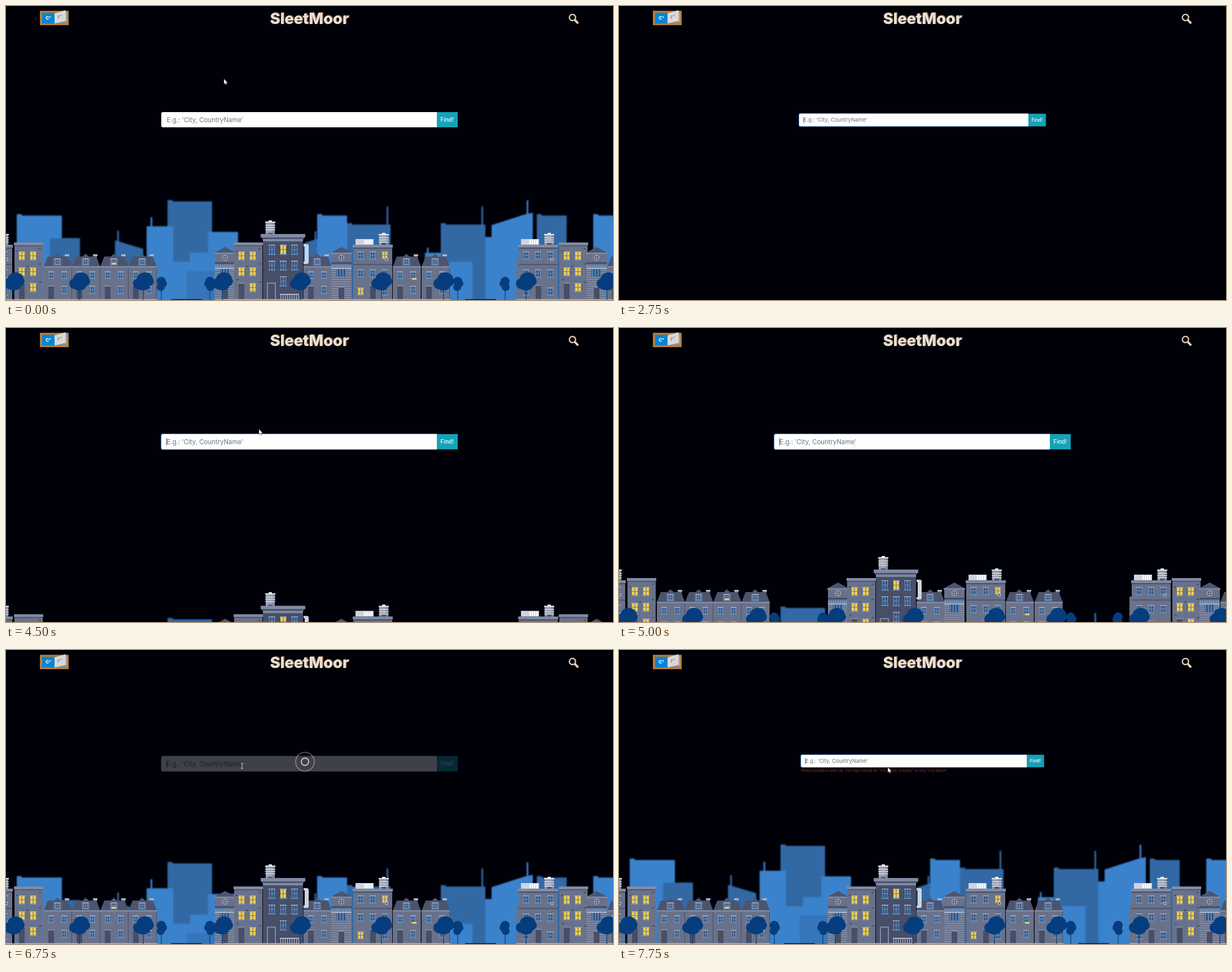
These frames come from a looping animation (1075 by 521 pixels, 8 s). An HTML page:

```html
<!DOCTYPE html>
<html lang="en">
<head>
<meta charset="utf-8">
<title>Weather search</title>
<style>
html, body { margin: 0; width: 100%; height: 100%; overflow: hidden; background: #000009; }
svg { display: block; width: 100%; height: 100%; font-family: Inter, Roboto, sans-serif; }
</style>
</head>
<body>
<svg id="stage" viewBox="0 0 1075 521" preserveAspectRatio="none">
  <defs>
    <filter id="soft" x="-2%" y="-2%" width="104%" height="104%"><feGaussianBlur stdDeviation="1.1"/></filter>
  </defs>
  <rect width="1075" height="521" fill="#000009"/>
  <g id="back" filter="url(#soft)"></g>
  <g id="front"></g>

  <g id="header">
    <rect x="60" y="8.500" width="51" height="25.500" fill="#b47d39"/>
    <rect x="64" y="12" width="43.500" height="19" fill="#93621f"/>
    <rect x="64" y="12" width="22" height="19" fill="#0585d3"/>
    <path d="M86 31 106 26 108 30 106 31z" fill="#8c8c8e"/>
    <path d="M105 8 108 11V30L105 27z" fill="#a6a6a8"/>
    <path d="M86 13 105.500 7.500V26.500L86 31z" fill="#d9d9db"/>
    <text x="75" y="24" font-size="8" font-weight="800" fill="#fff" text-anchor="middle">C°</text>
    <text transform="translate(95.500 22) skewY(-14)" font-size="8" font-weight="600" fill="#85858a" text-anchor="middle">F°</text>
    <g font-size="27.200" font-weight="800" text-anchor="middle">
      <text x="538.800" y="30.800" fill="#8a5930">SleetMoor</text>
      <text x="537.300" y="32" fill="#e6e1d9">SleetMoor</text>
    </g>
    <g fill="none">
      <g stroke="#7d5230" transform="translate(.9 -.6)"><circle cx="1003" cy="20.500" r="5.500" stroke-width="1.900"/><path d="M1007.300 24.800 1013 31" stroke-width="3.300"/></g>
      <g stroke="#e8dcc9"><circle cx="1003" cy="20.500" r="5.500" stroke-width="1.900"/><path d="M1007.300 24.800 1013 31" stroke-width="3.300"/></g>
    </g>
  </g>

  <g id="form">
    <g id="bar">
      <path id="ring" d="M763 187.500H278q-3.500 0-3.500 3.500v21q0 3.500 3.500 3.500H763z" fill="none" stroke="#1c55a0" stroke-width="1.400"/>
      <path d="M763 188H278q-3 0-3 3v21q0 3 3 3H763z" fill="#fff"/>
      <rect x="763" y="188" width="37" height="27" fill="#17a2b8"/>
      <text x="781.300" y="204.800" font-size="9.900" font-weight="500" fill="#fff" text-anchor="middle">Find!</text>
      <text id="hint" x="284.500" y="205.600" font-size="11.400" fill="#6c757d">E.g.: 'City, CountryName'</text>
      <text id="typed" x="284.500" y="205.600" font-size="11.400" fill="#495057"></text>
      <rect id="caret" y="195" width="1" height="13.500" fill="#495057"/>
    </g>
    <text id="error" x="275" y="218.300" font-size="7.450" fill="#a82c3a">Please provide a valid city. The input should be "City Name, Country" or only "City Name".</text>
  </g>

  <g id="list" font-size="6.900" font-weight="600" fill="#fff" style="font-family:'Open Sans','Noto Sans',sans-serif">
    <path d="M275 215H390V283q0 3-3 3H278q-3 0-3-3z" fill="#29292c"/>
    <text x="281.800" y="233">cordoba</text>
    <text x="281.800" y="253.300">cordoba, spain</text>
    <text x="281.800" y="273.600">cordoba, la cajeta de tu vieja</text>
  </g>

  <g id="loader" fill="none" stroke="#fff" stroke-width="1.900">
    <circle cx="529.500" cy="198"/><circle cx="529.500" cy="198"/>
  </g>
  <path id="arrow" d="M0 0V9.800L2.200 7.800 3.700 11 5.200 10.300 3.800 7.200H6.600z" fill="#fff" stroke="#222" stroke-width=".5"/>
  <path id="beam" d="M-2-4.500H2M0-4.500V4.500M-2 4.500H2" fill="none" stroke="#e4e4ea" stroke-width=".9"/>
</svg>
<script>
const $ = id => document.getElementById(id);
const LOOP = 8000, STEP = 250;

// Palette
const WALL = '#69728a', DARK = '#474e68', SLATE = '#4d556f', TRIM = '#808aa3', PALE = '#adb7cb',
  GLASS = '#38527f', SKY = '#6798cb', LIT = '#f5d04e', LEAF = '#063d7e', NEAR = '#3b82cc', FAR = '#3069a5';

const box = (x, y, w, h, c) => `<rect x="${x}" y="${y}" width="${w}" height="${h}" fill="${c}"/>`;
const poly = (pts, c) => `<polygon points="${pts}" fill="${c}"/>`;
const dot = (x, y, rx, ry, c) => `<ellipse cx="${x}" cy="${y}" rx="${rx}" ry="${ry}" fill="${c}"/>`;
const span = (n, f) => Array.from({ length: n }, (_, i) => f(i)).join('');

// Distant skyline
function skyline() {
  const tower = (x, to, y, c) => box(x, y, to - x, 540 - y, c);
  const notched = (x, to, y, c) => tower(x, to, y, c) + box(x, y - 2.5, 9, 4, c);
  const mast = (x, y, c) => box(x - 1.5, y, 3, 60, c);
  return notched(19, 99, 372, NEAR) + tower(78, 131, 412, FAR) +
    mast(198.5, 399, FAR) + poly('193,416 243,431 243,540 193,540', FAR) +
    notched(286, 365, 347, FAR) + mast(257.5, 375, NEAR) + tower(249, 296, 391, NEAR) +
    tower(358, 411, 401, NEAR) + tower(326, 360, 438, NEAR) + tower(285, 330, 454, NEAR) +
    box(320, 470, 49, 70, '#3576ba') +
    mast(548, 400, FAR) + poly('527,421 552,413 552,540 527,540', FAR) +
    mast(675.5, 356, FAR) + notched(604, 681, 388, FAR) + notched(551, 604, 372, NEAR) +
    mast(747, 429, NEAR) + tower(742, 771, 438, NEAR) +
    mast(843.5, 356, FAR) + notched(770, 849, 388, FAR) + tower(785, 826, 454, NEAR) +
    tower(849, 862, 410, NEAR) + notched(940, 993, 372, FAR) +
    mast(923.5, 345, NEAR) + poly('860,389 919,370 933,367 933,540 860,540', NEAR) +
    notched(1040, 1085, 372, NEAR);
}

// Parts of the street
function pane(x, y, lit, w = 10, h = 12) {
  const bar = lit ? WALL : SKY, left = x - w / 2, top = y - h / 2;
  return box(left - 1, top - 1.5, w + 2, 1.5, PALE) + box(left, top, w, h, lit ? LIT : GLASS) +
    (lit ? '' : box(left, top, 1, h, SKY) + box(left + w - 1, top, 1, h, SKY)) +
    box(x - .6, top, 1.2, h, bar) + box(left, y - .8, w, 1, bar) +
    box(left - 1.5, top + h, w + 3, 1.6, SKY);
}
const door = (x, y) => box(x - 6, y - 2, 12, 2, TRIM) + box(x - 5, y, 10, 521 - y, DARK);
const tank = (x, y, h) => box(x - 3, y, 6, 3, '#fff') + box(x - 9, y + 2, 18, 2.5, '#e6e9f0') +
  box(x - 8, y + 4.5, 16, h - 4.5, '#9aa0b2') + box(x + 4, y + 4.5, 4, h - 4.5, '#868da1') +
  span(3, i => box(x - 9, y + 8 + i * 4, 18, 1.2, '#dfe3ec')) + box(x - 4, y + h - 3, 8, 3, DARK);

function house(x) {
  return box(x + 1, 421, 50, 100, WALL) + box(x, 419, 52, 5, TRIM) + box(x + 1, 424, 50, 1.5, DARK) +
    [[14, 443], [34, 443], [14, 471], [34, 471], [34, 499]].map(([dx, y]) => pane(x + dx, y, true, 10, 13)).join('') +
    door(x + 14, 492) + [[44, 429], [4, 434], [44, 456], [22, 460], [5, 484], [45, 488]]
      .map(([dx, y]) => box(x + dx, y, 4, 2, DARK)).join('');
}

function terrace(x, lit) {
  const roof = `${x},462 ${x + 7},444 ${x + 43},444 ${x + 50},462`;
  return box(x + 37, 440, 8, 3, PALE) + box(x + 38, 443, 6, 6, TRIM) + poly(roof, SLATE) +
    span(4, i => box(x + 6 - i * 1.4, 447 + i * 4, 38 + i * 2.8, .8, DARK)) +
    poly(`${x + 14},448 ${x + 24},439 ${x + 34},448`, SLATE) + box(x + 17, 447, 14, 13, WALL) +
    pane(x + 24, 453, false, 8, 8) + (lit ? box(x + 20, 455, 8, 3, LIT) : '') +
    box(x, 462, 50, 59, WALL) + box(x, 461, 50, 2.5, TRIM) + box(x + 49, 464, 1, 57, DARK) +
    pane(x + 13, 477, false, 8, 10) + pane(x + 36, 477, false, 8, 10) + pane(x + 36, 503, false, 8, 11) + door(x + 13, 497);
}

function narrow(x) {
  const m = x + 18;
  return poly(`${x - 2},438 ${m},427 ${x + 38},438`, SLATE) + box(x, 438, 36, 83, WALL) + box(x - 1, 437, 38, 2.5, TRIM) +
    dot(m, 446, 5, 5, PALE) + dot(m, 446, 3.8, 3.8, DARK) + box(m - .5, 442, 1, 8, PALE) + box(m - 4, 445.5, 8, 1, PALE) +
    box(x, 454, 36, 3, DARK) + span(9, i => box(x + i * 4 + .5, 459, 2.5, 5, SKY)) + box(x, 464, 36, 2, PALE) +
    span(14, i => box(x, 468 + i * 4, 36, 1.1, '#8f9ab2')) + box(m - 9, 466, 18, 14, GLASS) +
    span(4, i => box(m - 8 + i * 5, 466, 1.5, 14, SKY)) + door(m, 499);
}

function block(x, lit) {
  const at = (c, r) => pane(x + 14 + c * 21.5, 442 + r * 32, lit && (r === 0 && c === 2 || r === 2 && c === 0), 9, 11);
  return tank(x + 55, 402, 21) + box(x + 5, 413, 32, 10, '#cfd4df') + span(4, i => box(x + 20 + i * 4, 414, 2.5, 8, '#fff')) +
    box(x + 1, 425, 69, 96, WALL) + box(x, 423, 71, 5, TRIM) + box(x + 1, 428, 69, 2, DARK) + box(x + 1, 457, 69, 2, SLATE) +
    span(3, c => at(c, 0) + at(c, 1)) + at(0, 2) + at(2, 2) + door(x + 36, 496) +
    dot(x + 60, 449, 3, 3, PALE) + dot(x + 60, 449, 1.5, 1.5, DARK);
}

function hall() {
  return tank(468, 380, 25) + box(455, 410, 71, 111, DARK) + box(451, 404, 79, 6, TRIM) +
    box(453, 410, 75, 3, SLATE) + box(455, 413, 71, 4, TRIM) +
    span(3, c => pane(471 + c * 20, 432, c === 1, 10, 15) + pane(471 + c * 20, 460, false, 10, 14)) +
    pane(491, 488, false, 10, 15) + box(462, 490, 16, 31, TRIM) + box(464, 492, 12, 29, DARK) +
    box(485, 510, 34, 2, PALE) + span(9, i => box(486 + i * 4, 512, 1.2, 9, PALE)) +
    '<path d="M527 422h6q3 0 3 3v29q0 3-3 3h-6v-4h2v-27h-2z" fill="#cdd3e0"/>';
}

function tree(x, small, flip) {
  const s = flip ? -1 : 1;
  const trunk = box(x - .6, 495, 1.2, 26, LEAF);
  return trunk + (small
    ? dot(x, 488, 8, 8, LEAF) + dot(x + 3 * s, 492, 7, 7, LEAF) + dot(x - s, 498, 7, 7, LEAF)
    : dot(x + 3 * s, 484, 14, 12, LEAF) + dot(x - 7 * s, 492, 11, 10, LEAF) + dot(x + 9 * s, 488, 10, 9, LEAF) + dot(x, 496, 12, 8, LEAF));
}

function street() {
  return box(292, 519.5, 55, 20, '#0a2149') + box(813, 519.5, 55, 20, '#0a2149') +
    block(-59) + house(14) + [67, 117, 167, 217].map(x => terrace(x, x === 167)).join('') +
    terrace(527) + narrow(370) + house(403) + hall() + narrow(576) +
    terrace(685) + terrace(736) + box(719, 482, 8, 3, LIT) + block(614, true) +
    block(907) + box(904, 452, 4, 69, WALL) + terrace(1065) + house(979) + narrow(1028) +
    [[0, 268], [370, 416], [786, 1], [904, 171]].map(([x, w]) => box(x, 519.5, w, 1.5, PALE)).join('') +
    [14, 130, 243, 521, 665, 775, 921, 1064].map(x => tree(x, false)).join('') +
    tree(275, true) + tree(361, true, true) + tree(383, false) + tree(800, true) + tree(884, true, true);
}

$('back').innerHTML = skyline();
$('front').innerHTML = street();

// Motion
const clamp = v => Math.min(1, Math.max(0, v));
function bezier(x1, y1, x2, y2) {
  const at = (a, b, u) => 3 * a * u * (1 - u) ** 2 + 3 * b * u * u * (1 - u) + u ** 3;
  return p => {
    p = clamp(p);
    let lo = 0, hi = 1;
    for (let i = 0; i < 24; i++) {
      const mid = (lo + hi) / 2;
      if (at(x1, x2, mid) < p) lo = mid; else hi = mid;
    }
    return at(y1, y2, (lo + hi) / 2);
  };
}
const ease = bezier(.25, .1, .25, 1), easeInOut = bezier(.42, 0, .58, 1);

// Pointer route: time, x, y
const route = [[0, 386, 129], [500, 338, 155], [750, 338, 155], [1250, 231, 12], [1499, 215, -12],
  [3250, 500, -14], [3500, 492, 10], [4000, 466, 120], [4500, 448, 179], [5000, 418, 205.5], [7250, 418, 205.5], [7750, 476, 207.5], [8000, 476, 207.5]];
function pointer(t) {
  const i = Math.max(1, route.findIndex(k => k[0] > t));
  const [a, b] = [route[i - 1], route[i]];
  const p = clamp((t - a[0]) / (b[0] - a[0]));
  return [a[1] + (b[1] - a[1]) * p, a[2] + (b[2] - a[2]) * p];
}

const show = (id, on) => $(id).style.display = on ? '' : 'none';
const move = (id, x, y) => $(id).setAttribute('transform', `translate(${x} ${y})`);

function entry(t) {
  if (t < 5500 || t >= 6750) return '';
  return t < 5750 ? 'c' : t < 6250 ? 'co' : 'cordoba, la cajeta de tu vieja';
}

function draw(t) {
  const reloaded = t >= 2500, failed = t >= 7500, loading = t >= 6750 && !failed;

  move('front', 0, reloaded ? 142 * (1 - easeInOut((t - 3750) / 1750)) : 0);
  move('back', 0, (reloaded ? 179 * (1 - easeInOut((t - 3850) / 4100)) : 0) - .7);

  // The search bar zooms in after each page load
  const p = !reloaded ? 1 : clamp((t - (failed ? 7304 : 2289)) / 1000);
  const scale = .3 + .7 * ease(p);
  $('form').setAttribute('transform', `translate(537.5 205) scale(${scale}) translate(-537.5 -205)`);
  $('form').setAttribute('opacity', loading ? .25 : ease(p * 2));
  move('bar', 0, failed ? -6.6 : 0);
  show('error', failed);
  show('ring', reloaded);

  const text = entry(t);
  $('typed').textContent = text;
  show('hint', !text);
  show('caret', t >= 2250);
  $('caret').setAttribute('x', 284 + (text ? $('typed').getComputedTextLength() + .8 : 0));
  show('list', t >= 5500 && t < 6250);

  show('loader', loading);
  [...$('loader').children].forEach((ring, i) => {
    const q = ((t - 6570) / 1800 + i / 2) % 1;
    ring.setAttribute('r', 1 + 16 * (1 - (1 - clamp(q)) ** 4));
    ring.setAttribute('opacity', .8 * clamp(1 - q));
  });

  const [x, y] = pointer(t);
  const inField = t >= 5000 && t < 7500;
  const away = t >= 1500 && t < 3500;
  show('arrow', !inField && !away);
  show('beam', inField);
  move('arrow', x, y);
  move('beam', x, y);
}

const start = performance.now();
function tick() {
  const t = (performance.now() - start) % LOOP;
  draw(Math.floor(t / STEP) * STEP);
  requestAnimationFrame(tick);
}
tick();
</script>
</body>
</html>
```
